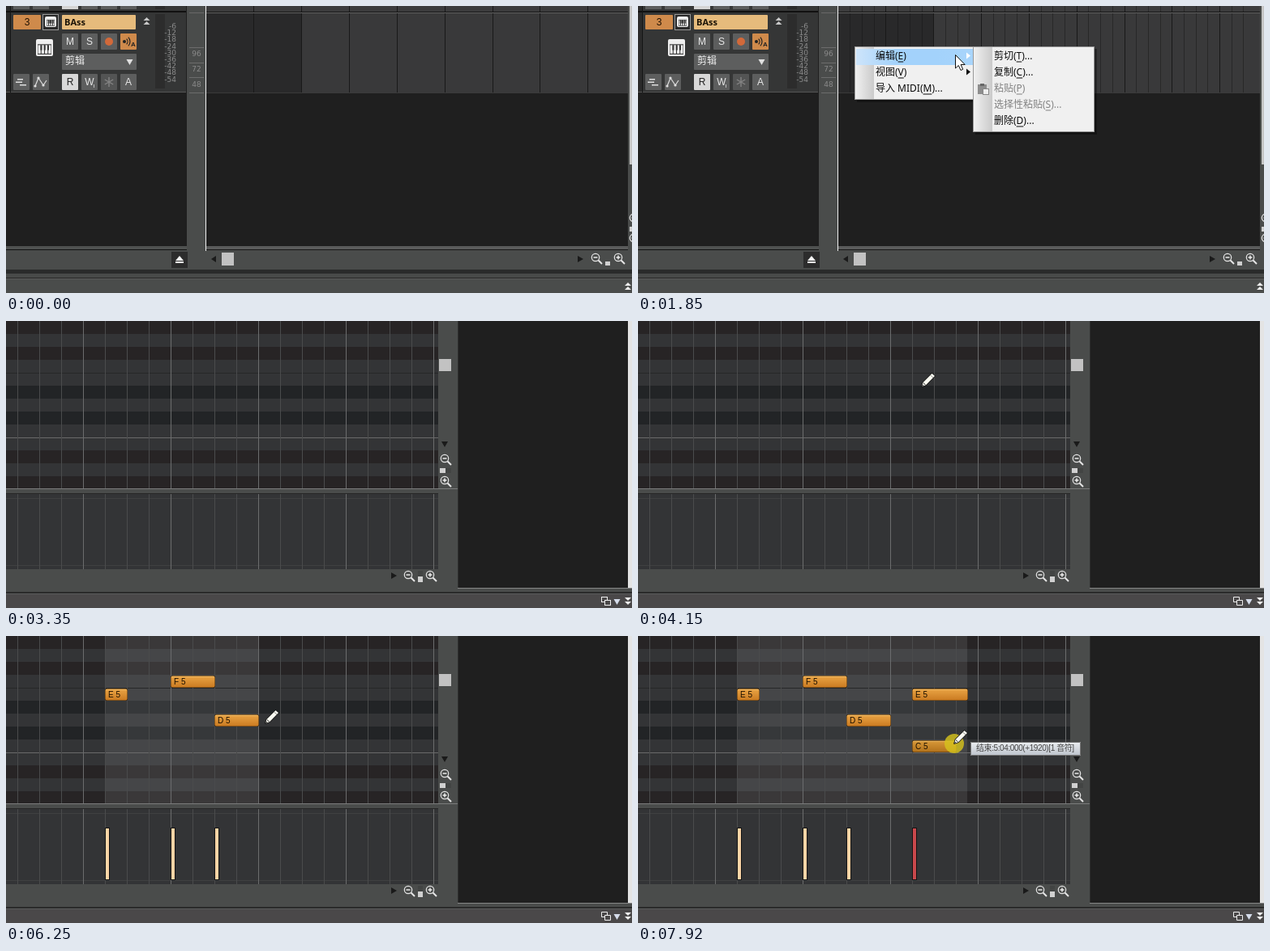
An HTML page with a canvas for the animation above (8 s loop, 772 by 355 pixels).

```html
<!DOCTYPE html>
<html lang="zh">
<head>
<meta charset="utf-8">
<style>
html, body { margin: 0; width: 100%; height: 100%; overflow: hidden; background: #1f1f1f; }
canvas { display: block; width: 772px; height: 355px; }
</style>
</head>
<body>
<canvas id="stage" width="772" height="355"></canvas>
<script>
const g = document.getElementById('stage').getContext('2d');
const LOOP = 8000;
const PANEL = '#4a4c4b', DARK = '#1f1f1f', WHITE = '#f4f4f4';
const UI = '12px "Noto Sans", "Noto Sans CJK SC", "Noto Sans CJK", sans-serif';
const TIP = '10px "Liberation Sans", "Noto Sans CJK SC", "Noto Sans CJK", sans-serif';
const SMALL = '9px "DejaVu Sans", sans-serif';

function rect(x, y, w, h, color) {
  g.fillStyle = color;
  g.fillRect(x, y, w, h);
}
function frame(x, y, w, h, color) {
  g.strokeStyle = color;
  g.lineWidth = 1;
  g.strokeRect(x + .5, y + .5, w - 1, h - 1);
}
function round(x, y, w, h, r, color) {
  g.fillStyle = color;
  g.beginPath();
  g.roundRect(x, y, w, h, r);
  g.fill();
}
function text(s, x, y, font, color, align = 'left') {
  g.font = font;
  g.fillStyle = color;
  g.textAlign = align;
  g.textBaseline = 'middle';
  g.fillText(s, x, y);
}
function path(points, x = 0, y = 0) {
  g.beginPath();
  for (let i = 0; i < points.length; i += 2) g.lineTo(x + points[i], y + points[i + 1]);
}
function poly(points, x, y, color) {
  path(points, x, y);
  g.closePath();
  g.fillStyle = color;
  g.fill();
}
function line(points, x, y, color, width = 1) {
  path(points, x, y);
  g.strokeStyle = color;
  g.lineWidth = width;
  g.stroke();
}
function disc(x, y, r, color) {
  g.fillStyle = color;
  g.beginPath();
  g.arc(x, y, r, 0, 7);
  g.fill();
}
function ramp(x0, y0, x1, y1, ...colors) {
  const grad = g.createLinearGradient(x0, y0, x1, y1);
  colors.forEach((c, i) => grad.addColorStop(i / (colors.length - 1), c));
  return grad;
}

// keys: rows of [time, x, y]
function follow(keys, t) {
  let a = keys[0];
  for (const b of keys) {
    if (t < b[0]) {
      const k = b === a ? 0 : (t - a[0]) / (b[0] - a[0]);
      return [a[1] + (b[1] - a[1]) * k, a[2] + (b[2] - a[2]) * k];
    }
    a = b;
  }
  return [a[1], a[2]];
}

function zoomIcon(x, y, plus) {
  g.strokeStyle = '#e6e6e6';
  g.lineWidth = 1.2;
  g.beginPath();
  g.arc(x, y, 4.7, 0, 7);
  g.stroke();
  line([3.5, 3.5, 8, 8], x, y, '#e6e6e6', 2);
  rect(x - 2.5, y - .7, 5, 1.4, WHITE);
  if (plus) rect(x - .7, y - 2.5, 1.4, 5, WHITE);
}
function chevrons(x, y, dir, color) {
  for (const d of [0, 5]) poly([-4, 2 * dir, 0, -2 * dir, 4, 2 * dir], x, y + d, color);
}
function keysIcon(x, y, w, h) {
  round(x, y, w, h, 2, '#eeeeee');
  rect(x + 2, y + h * .3, w - 4, h * .6, '#333');
  const n = 4, step = (w - 4) / n;
  for (let i = 0; i < n; i++) rect(x + 2.5 + i * step, y + h * .35, step - 1, h * .5, '#eee');
  for (let i = 1; i < n; i++) rect(x + 1.2 + i * step, y + h * .35, 2, h * .3, '#333');
}
function button(x, y, label, color = '#5d5e5e', ink = '#e8e8e8') {
  round(x, y, 20, 20, 1, color);
  if (label) text(label, x + 10, y + 10.5, '12px "Liberation Sans", sans-serif', ink, 'center');
}

function trackHeader() {
  rect(0, 0, 223, 302, DARK);
  rect(0, 0, 5, 107, '#2b2b2b');
  rect(6, 0, 216, 6, '#363737');
  rect(6, 8, 216, 98, '#353636');
  rect(0, 6, 222, 2, '#111');
  rect(0, 106, 222, 1, '#555');
  rect(5, 0, 1, 107, '#151515');
  for (const x of [9, 33, 93, 117, 141]) rect(x, 0, 20, 4, '#5d5e5e');
  rect(69, 0, 20, 4, '#d5d5d5');
  rect(184, 0, 12, 4, '#2c2c2c');

  round(9, 11, 34, 18, 1, '#cf8a4b');
  text('3', 26, 20.5, '12px "Liberation Sans", sans-serif', '#201000', 'center');
  rect(45, 10, 20, 20, '#2a2a2a');
  frame(45, 10, 20, 20, '#999');
  keysIcon(48, 13, 14, 13);
  round(69, 11, 91, 18, 1, '#e6bb7c');
  text('BAss', 72, 20.5, 'bold 11px "Noto Sans", sans-serif', '#1a1206');
  chevrons(173.5, 16, 1, '#c8c8c8');
  keysIcon(37, 41, 21, 21);

  button(69, 34, 'M');
  button(93, 34, 'S');
  button(117, 34, '');
  disc(127, 44, 5, '#d2693a');
  button(141, 34, '', '#cf8a4b');
  disc(146, 44, 2, '#222');
  g.strokeStyle = '#222';
  g.lineWidth = 1.2;
  for (const r of [5, 8]) {
    g.beginPath();
    g.arc(145, 44, r, -.75, .75);
    g.stroke();
  }
  text('A', 157, 48, 'bold 8px "Liberation Sans", sans-serif', '#222', 'center');

  round(69, 59, 92, 20, 1, '#5d5e5e');
  text('剪辑', 73, 69, UI, '#f0f0f0');
  poly([-4, -3, 4, -3, 0, 4], 152.5, 69, '#e0e0e0');

  button(9, 84, '');
  for (const [x, y, w] of [[14, 90, 7], [12, 93.5, 8], [17, 97, 8]]) rect(x, y, w, 1.5, '#ddd');
  button(33, 84, '');
  line([36, 99, 40, 89, 46, 98, 50, 92], 0, 0, '#ddd', 1.2);
  for (const [x, y] of [[36, 99], [40, 89], [46, 98]]) disc(x, y, 1.6, '#ddd');
  button(69, 84, 'R', '#d8d8d8', '#222');
  button(93, 84, 'W');
  rect(108, 97, 1, 4, '#bbb');
  button(117, 84, '', '#535454');
  for (let i = 0; i < 3; i++) {
    const a = Math.PI / 6 + i * Math.PI / 3, c = 6 * Math.cos(a), s = 6 * Math.sin(a);
    line([-c, -s, c, s], 127, 94, '#858585', 1.4);
  }
  button(141, 84, 'A');

  rect(184, 10, 12, 92, '#2c2c2c');
  for (let i = 1; i < 10; i++) text('-' + i * 6, 210, 17.5 + i * 8.2, SMALL, '#8b8b8b', 'right');
}

function arrangeView(fine) {
  rect(0, 0, 772, 355, PANEL);
  trackHeader();
  rect(223, 0, 24, 302, PANEL);
  rect(226, 8, 18, 1, '#686868');
  for (const y of [51, 70, 88, 107]) rect(226, y, 18, 1, '#6c6c6c');
  ['96', '72', '48'].forEach((s, i) => text(s, 235, 60 + i * 18.7, SMALL, '#8a8a8a', 'center'));

  rect(247, 0, 520, 297, DARK);
  rect(247, 0, 117, 107, '#29292a');
  rect(364, 0, 403, 107, '#39393a');
  rect(247, 0, 520, 7, '#3c3c3d');
  if (fine) for (let i = 1; i < 35; i++) if (i % 4) rect(Math.round(246.6 + i * 14.7), 0, 1, 107, 'rgba(20,20,20,.45)');
  for (let i = 1; i < 9; i++) rect(Math.round(246.4 + i * 58.85), 0, 1, 107, '#191919');
  rect(247, 7, 520, 1, '#151515');
  rect(247, 8, 520, 1, '#626262');
  rect(247, 107, 520, 1, '#3a3a3a');
  rect(246, 0, 1, 303, '#f0f0f0');

  rect(0, 297, 223, 4, '#4f5150');
  rect(247, 297, 520, 4, '#5a5b5b');
  rect(0, 301, 223, 1, '#111');
  rect(247, 301, 525, 1, '#161616');
  rect(204, 304, 20, 20, '#2c2c2c');
  poly([-5, 2, 0, -4, 5, 2], 214, 313, WHITE);
  rect(209, 316, 10, 2, WHITE);
  poly([3, -4, 3, 4, -3, 0], 256, 313, '#1a1a1a');
  rect(266, 305, 15, 16, '#c2c2c2');
  poly([-3, -4, -3, 4, 4, 0], 708, 313, '#1a1a1a');
  zoomIcon(727, 311, false);
  rect(739, 316, 6, 5, '#d0d0d0');
  zoomIcon(755, 311, true);
  rect(767, 0, 5, 302, PANEL);
  rect(769, 0, 3, 196, '#c6c6c6');
  zoomIcon(774, 262, false);
  rect(769, 273, 3, 6, '#d0d0d0');
  zoomIcon(774, 287, true);

  rect(0, 326, 772, 5, '#2a2b2b');
  rect(0, 331, 772, 5, '#484a49');
  rect(0, 336, 772, 1, '#262626');
  rect(0, 337, 772, 1, '#5b5c5c');
  chevrons(767, 344, 1, '#eee');
}

function mnemonic(s, x, y, color) {
  text(s, x, y, UI, color);
  const i = s.indexOf('(') + 1;
  const from = g.measureText(s.slice(0, i)).width;
  rect(x + from, y + 6, g.measureText(s[i]).width, 1, color);
}
function menu(x, y, w, items, hot, icons) {
  const h = items.length * 20 + 6;
  rect(x + 3, y + 3, w, h, 'rgba(0,0,0,.35)');
  rect(x, y, w, h, '#f0f0f0');
  rect(x + 1, y + 1, 23, h - 2, ramp(x, 0, x + 24, 0, '#f2f2f2', '#cacaca'));
  frame(x, y, w, h, '#9a9a9a');
  items.forEach(([label, right, off], i) => {
    const top = y + 3 + i * 20, mid = top + 9.5;
    if (i === hot) rect(x + 2, top, w - 4, 20, ramp(x, 0, x + w, 0, '#cfe5fa', '#a3d2fb', '#a3d2fb', '#a9d5fb'));
    const ink = off ? '#828282' : '#0a0a0a';
    mnemonic(label, x + 26, mid, ink);
    if (right === '>') poly([-2, -4, -2, 4, 3, 0], x + w - 12, mid - 1, i === hot ? '#fff' : '#111');
    else if (right) text(right, x + w - 6, mid, UI.replace('12px', '12.4px'), ink, 'right');
    if (icons && icons[i]) icons[i](x + 6, top + 3);
  });
}

const pasteIcon = (x, y) => {
  rect(x, y + 1, 11, 12, '#8d8d8d');
  rect(x + 3, y, 5, 3, '#666');
  rect(x + 6, y + 6, 8, 8, '#eee');
  frame(x + 6, y + 6, 8, 8, '#888');
};
const viewIcons = [
  (x, y) => {
    rect(x, y, 15, 14, '#161616');
    for (let i = 0; i < 4; i++) rect(x + 1 + i * 3.6, y + 1, 2.5, 12, '#fff');
    for (let i = 0; i < 3; i++) rect(x + 3 + i * 3.6, y, 2.6, 8, '#161616');
  },
  (x, y) => { for (let i = 0; i < 9; i++) rect(x + 1 + i % 3 * 5, y + 1 + Math.floor(i / 3) * 5, 3, 3, '#161616'); },
  (x, y) => { for (let i = 0; i < 12; i++) rect(x + i % 3 * 6, y + 1 + Math.floor(i / 3) * 3.3, 4.5, 1.6, '#222'); },
  (x, y) => {
    for (const d of [0, 6, 12]) rect(x, y + d + .5, 15, 1.3, '#222');
    rect(x, y, 1.5, 14, '#222');
  },
  (x, y) => {
    poly([0, 1, 8, 1, 4, 6], x, y, '#999');
    for (let i = 0; i < 5; i++) rect(x + 4 + i * 2, y + 9 - i % 3 * 2, 1.3, 2 + i % 3 * 4, '#999');
  },
  (x, y) => text('L', x + 8, y + 7.5, 'bold 14px "Liberation Serif", serif', '#111', 'center'),
  (x, y) => [4, 8, 3].forEach((d, i) => {
    rect(x + 2 + i * 5, y + 1, 1.3, 13, '#222');
    rect(x + .7 + i * 5, y + d, 4, 3.5, '#222');
  })
];
const mainItems = [['编辑(E)', '>'], ['视图(V)', '>'], ['导入 MIDI(M)...']];
const editItems = [['剪切(T)...'], ['复制(C)...'], ['粘贴(P)', '', true], ['选择性粘贴(S)...', '', true], ['删除(D)...']];
const viewItems = [
  ['钢琴卷帘(P)', 'Alt+3'], ['步进音序器(S)', 'Alt+4'], ['事件列表(E)', 'Alt+8'], ['乐谱(F)', 'Alt+6'],
  ['Loop 构建(N)', 'Alt+7', true], ['歌词(L)', 'Alt+Shift+1'], ['控制台(C)', 'Alt+2']
];

function arrow(x, y) {
  path([0, 0, 0, 16.5, 3.8, 13, 6.5, 19, 9.2, 17.8, 6.6, 12, 11.7, 12], x + .5, y + .5);
  g.closePath();
  g.fillStyle = '#fff';
  g.fill();
  g.strokeStyle = '#111';
  g.lineWidth = 1;
  g.stroke();
}
function beam(x, y) {
  rect(x - .5, y - 9, 1, 18, '#ddd');
  rect(x - 3.5, y - 10, 7, 1, '#ddd');
  rect(x - 3.5, y + 9, 7, 1, '#ddd');
}
function pressSpot(x, y) { disc(x, y, 12, 'rgba(214,194,28,.82)'); }

const beamPath = [[70, 358, 31], [350, 320, 38], [620, 267, 50]];
const arrowPath = [
  [950, 267, 50], [1370, 300, 56], [1570, 306, 57], [1850, 391, 60], [2060, 396, 62],
  [2520, 396, 62], [2700, 375, 73], [2870, 369, 75], [3000, 385, 76], [3280, 448, 78]
];

function arrangeScene(t) {
  arrangeView(t >= 950);
  if (t < 70) return;
  if (t < 950) {
    const [x, y] = follow(beamPath, t);
    if (t >= 620 && t < 820) pressSpot(x, y);
    beam(x, y);
    return;
  }
  const [x, y] = follow(arrowPath, t);
  const hot = t < 1570 ? -1 : t < 2600 ? 0 : 1;
  g.globalAlpha = Math.min(1, .2 + (t - 950) / 320);
  menu(267, 50, 152, mainItems, hot);
  g.globalAlpha = 1;
  if (t >= 1780 && t < 2660) menu(413, 50, 150, editItems, -1, [0, 0, pasteIcon]);
  if (t >= 2790) menu(413, 70, 173, viewItems, x > 413 ? 0 : -1, viewIcons);
  if (t >= 3210) pressSpot(x, y);
  arrow(x, y);
}

const CELL = 27, BAR4 = 203.5;
// name, column in half beats from bar 4, top, press and release times
const notes = [
  { name: 'E 5', col: -6, y: 65, down: 4540, up: 4800, len: 2 },
  { name: 'F 5', col: 0, y: 49, down: 5200, up: 5640, len: 4 },
  { name: 'D 5', col: 4, y: 97, down: 5900, up: 6160, len: 4 },
  { name: 'E 5', col: 10, y: 65, down: 6390, up: 6660, len: 5 },
  { name: 'C 5', col: 10, y: 129, down: 7500, up: 9000, len: 4 }
];
const penPath = [
  [3550, 453, 95], [4080, 453, 95], [4150, 350, 81], [4400, 150, 74], [4540, 134, 73], [4780, 147, 73],
  [4920, 166, 68], [4990, 172, 66], [5200, 216, 57], [5410, 247, 52], [5560, 256, 54], [5640, 256, 56],
  [5760, 270, 78], [5830, 271, 90], [5900, 268, 104], [6130, 311, 104], [6250, 320, 108],
  [6390, 351, 73], [6590, 405, 72], [6800, 404, 76], [7100, 378, 108], [7430, 343, 133], [7500, 343, 133], [7920, 390, 133]
];
const noteX = n => BAR4 + n.col * CELL / 2;

function rollView(bandEnd) {
  rect(0, 0, 772, 355, PANEL);
  for (let i = 0; i < 13; i++) {
    const black = [0, 2, 5, 7, 10, 12].includes(i);
    rect(0, i * 16, 533, 16, !black ? '#333436' : i === 5 || i === 7 ? '#222426' : '#272425');
  }
  if (bandEnd) rect(122, 0, Math.round(bandEnd) - 122, 207, 'rgba(255,255,255,.09)');
  rect(0, 64, 533, 1, '#262728');
  rect(0, 144, 533, 1, '#6a6a6a');
  rect(0, 207, 557, 1, '#7b7c7c');
  rect(0, 208, 557, 5, PANEL);
  rect(0, 213, 533, 94, '#333436');
  rect(0, 213, 533, 1, '#262626');
  rect(0, 219, 533, 1, '#3f4041');
  rect(0, 302, 533, 1, '#3f4041');
  for (let i = 0; i < 20; i++) {
    const x = Math.floor(14.5 + i * CELL), strong = i % 4 === 3;
    const color = strong ? '#6b6c6d' : '#4a4b4c';
    rect(x, 0, 1, 207, color);
    rect(x, 214, 1, 93, color);
  }
  rect(533, 0, 24, 207, PANEL);
  rect(534, 47, 15, 15, '#c2c2c2');
  poly([-4, -3, 4, -3, 0, 4], 541, 152, '#1a1a1a');
  zoomIcon(541, 170, false);
  rect(535, 182, 14, 6, '#424443');
  rect(535, 182, 7, 6, '#d0d0d0');
  zoomIcon(541, 197, true);
  poly([-3, -4, -3, 4, 4, 0], 478, 315, '#1a1a1a');
  zoomIcon(496, 314, false);
  rect(508, 309, 6, 7, '#424443');
  rect(508, 316, 6, 7, '#d0d0d0');
  zoomIcon(523, 314, true);

  rect(557, 0, 210, 330, DARK);
  rect(557, 0, 1, 330, '#303030');
  rect(557, 330, 215, 1, '#858686');
  rect(767, 0, 5, 330, '#e4e4e4');
  rect(0, 335, 772, 2, '#2a2a2a');
  rect(0, 337, 772, 1, '#5b5c5c');
  rect(0, 338, 772, 17, '#4a4849');
  frame(734, 341, 8, 7, '#eee');
  rect(738, 345, 8, 7, '#4a4849');
  frame(738, 345, 8, 7, '#eee');
  poly([-4, -3, 4, -3, 0, 4], 753.5, 347, '#d5dcea');
  chevrons(767, 344, -1, '#eee');
}

function drawNote(n, len, held) {
  const x = Math.round(noteX(n) - .2), w = Math.round(len * CELL / 2);
  const colors = held ? ['#d99a3a', '#b0701a'] : ['#eba646', '#c97920'];
  round(x, n.y, w + 1, 15, 2, '#3a250c');
  round(x + .5, n.y + .5, w, 14, 2, ramp(0, n.y, 0, n.y + 15, ...colors));
  rect(x + 1, n.y + 1, w - 1, 1, 'rgba(255,220,150,.35)');
  text(n.name, x + 4, n.y + 8.5, '10px "Liberation Sans", sans-serif', '#1c1000');
}
function velocity(n, held) {
  const x = Math.round(noteX(n) - .5);
  rect(x, 237, 6, 65, '#141414');
  rect(x + 1, 238, 4, 63, held ? '#c9484c' : '#fbd5a6');
}
function tooltip(n, len, x, y) {
  const half = 24 + n.col + len;
  const end = [Math.floor(half / 8) + 1, String(Math.floor(half % 8 / 2) + 1).padStart(2, '0'), half % 2 ? '480' : '000'];
  x = Math.round(x) + 20;
  y = Math.round(y) - 2;
  rect(x, y, 136, 17, ramp(0, y, 0, y + 17, '#eceff2', '#bcc2cb'));
  frame(x, y, 136, 17, '#777');
  g.letterSpacing = '-0.4px';
  text(`结束:${end.join(':')}(+${len * 480})[1 音符]`, x + 7, y + 8.5, TIP, '#454545');
  g.letterSpacing = '0px';
}
function pen(x, y) {
  path([0, 0, 1.5, -5, 12.5, -16, 16, -13, 5, -1.8], x, y);
  g.closePath();
  g.lineJoin = 'round';
  g.strokeStyle = '#141414';
  g.lineWidth = 1.6;
  g.stroke();
  g.fillStyle = '#fbfbf2';
  g.fill();
  line([1.8, -4.5, 4.6, -2], x, y, '#222');
  line([10.5, -14, 14, -11], x, y, '#777', .8);
  poly([0, 0, .8, -2.4, 2.4, -.9], x, y, '#222');
}

function rollScene(t) {
  const [x, y] = follow(penPath, t);
  const live = notes.filter(n => t >= n.down);
  const done = live.filter(n => t >= n.up);
  const held = live.find(n => t < n.up);
  const last = done[done.length - 1];
  rollView(last && noteX(last) + last.len * CELL / 2);
  const heldLen = held && Math.max(1, Math.min(held.len, Math.ceil((x - noteX(held)) / (CELL / 2))));
  for (const n of live) {
    drawNote(n, n === held ? heldLen : n.len, n === held);
    velocity(n, n === held);
  }
  if (held) {
    pressSpot(x, y);
    tooltip(held, heldLen, x, y);
  }
  if (t >= 3550) pen(x, y);
}

function draw(now) {
  const t = now % LOOP;
  g.clearRect(0, 0, 772, 355);
  if (t < 3350) arrangeScene(t);
  else rollScene(t);
}
let start;
function tick(now) {
  start ??= now;
  draw(now - start);
  requestAnimationFrame(tick);
}
draw(0);
requestAnimationFrame(tick);
</script>
</body>
</html>
```
